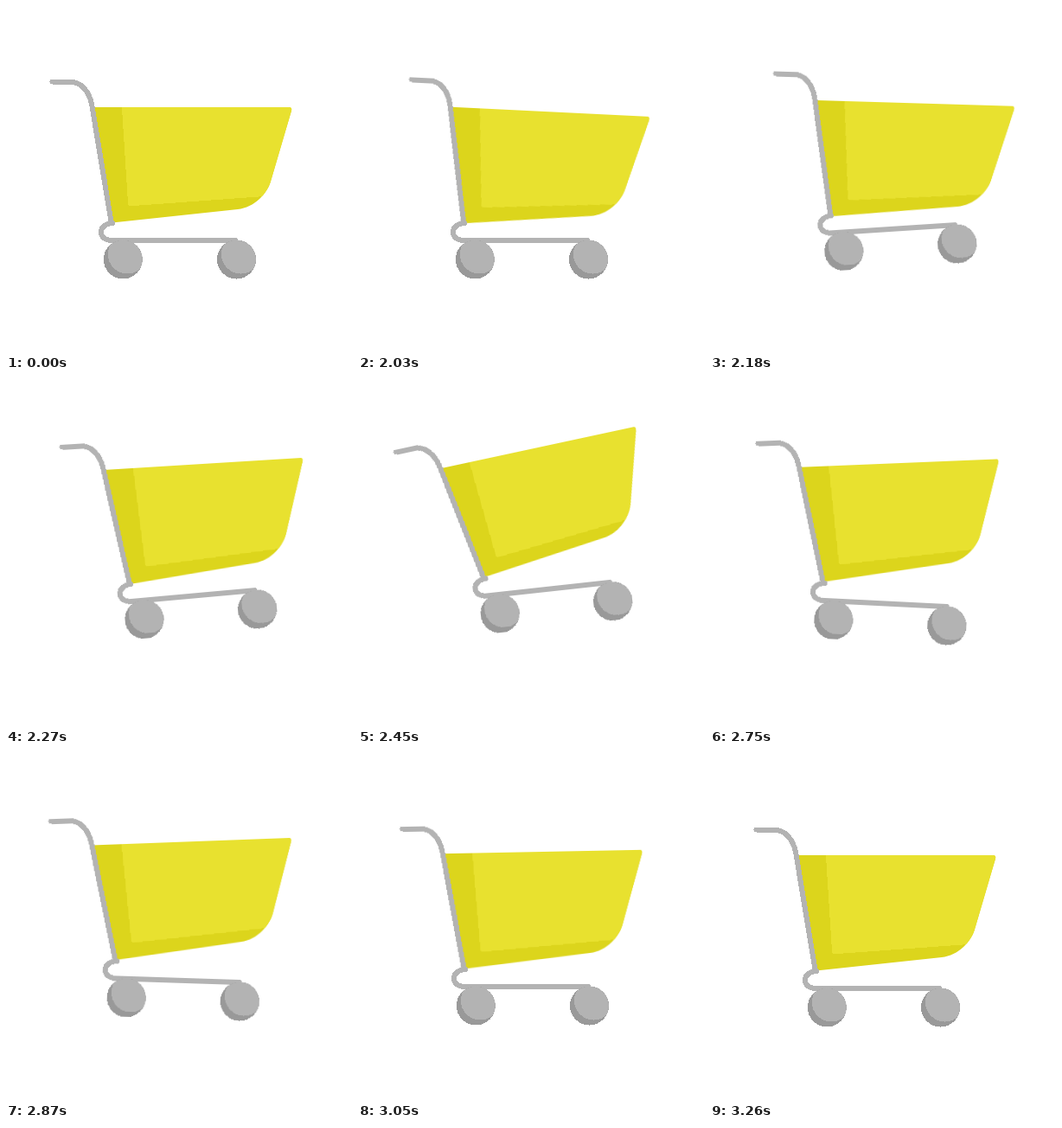
These frames come from a looping animation (400x400 px, 3320 ms). An HTML page:

```html
<!DOCTYPE html>
<html lang="en">
<head>
<meta charset="utf-8">
<title>Hopping cart</title>
<style>
  html, body { margin: 0; width: 100%; height: 100%; overflow: hidden; background: #fff; }
  svg { display: block; width: 100vw; height: 100vh; shape-rendering: crispEdges; }
  #cart { transform-origin: 135px 293px; }
  #basket { transform-origin: 110px 260px; }
  .tube { fill: none; stroke: #b3b3b3; stroke-width: 6; stroke-linecap: round; stroke-linejoin: round; }
</style>
</head>
<body>
<svg viewBox="0 0 400 400">
  <defs>
    <clipPath id="rim"><circle r="22.5"/></clipPath>
    <clipPath id="tub">
      <path d="M101 117H327Q331 117 330 121L306.5 201C302.5 217 287 233 268 235L123 250.5Z"/>
    </clipPath>
    <g id="wheel">
      <circle r="22.5" fill="#999"/>
      <circle cx="5" cy="-6" r="22.5" fill="#b3b3b3" clip-path="url(#rim)"/>
    </g>
  </defs>
  <g id="cart">
    <g id="basket">
      <g clip-path="url(#tub)">
        <path fill="#dcd51c" d="M95 110H340V260H95Z"/>
        <path fill="#e8e12f" d="M133.5 110H340V217L145 231.2Q141.5 231.4 141 228Z"/>
      </g>
      <path class="tube" d="M53.5 87.5H73C88 87.5 97 100 99.5 116L121.5 249"/>
    </g>
    <path class="tube" d="M123.5 251C114 251.5 110 256.5 110 261C110 267 114.5 270.8 122 270.8H265"/>
    <use href="#wheel" x="135.3" y="293"/>
    <use href="#wheel" x="266.5" y="293"/>
  </g>
</svg>
<script>
const LOOP = 3320, START = 2030, STEP = 30, END = 3260;

// Key poses: time, cart x, cart y, cart tilt, basket tilt
const poses = [
  [START, 0, 0, 0, 2.8],        // crouch
  [2180, 19.5, -9.5, -3.7, 5.4], // take off
  [2420, 29, -24, -6.5, -6.5],  // top of the first hop
  [2610, 26, -9, -1, 2.5],      // touch down
  [2750, 7.5, -15.5, 2.85, -5.2], // hop back
  [3050, 1, -2, 0, -1.1],       // land
  [END, 0, 0, 0, 0]
];

const slope = (i, c) =>
  (poses[i + 1][c] - poses[i][c]) / (poses[i + 1][0] - poses[i][0]);

// Flat at turning points, so the curve never overshoots a pose
function tangent(i, c) {
  if (i === 0 || i === poses.length - 1) return 0;
  const a = slope(i - 1, c), b = slope(i, c);
  return a * b > 0 ? 2 * a * b / (a + b) : 0;
}

function valueAt(t, c) {
  let i = 0;
  while (i < poses.length - 2 && t >= poses[i + 1][0]) i++;
  const [p, q] = [poses[i], poses[i + 1]];
  const d = q[0] - p[0], u = (t - p[0]) / d, v = 1 - u;
  return v * v * (1 + 2 * u) * p[c] + u * u * (3 - 2 * u) * q[c]
    + d * u * v * (v * tangent(i, c) - u * tangent(i + 1, c));
}

const move = (x, y, deg) => `translate(${x}px, ${y}px) rotate(${deg}deg)`;

function play(id, transformAt) {
  const rest = move(0, 0, 0);
  const frames = [{ offset: 0, transform: rest, easing: "step-end" }];
  for (let t = START; t <= END; t += STEP) {
    frames.push({ offset: t / LOOP, transform: transformAt(t), easing: "step-end" });
  }
  frames.push({ offset: 1, transform: rest });
  const anim = document.getElementById(id).animate(frames, { duration: LOOP, iterations: Infinity });
  anim.startTime = document.timeline.currentTime;
}

play("cart", t => move(valueAt(t, 1), valueAt(t, 2), valueAt(t, 3)));
play("basket", t => move(0, 0, valueAt(t, 4)));
</script>
</body>
</html>
```
